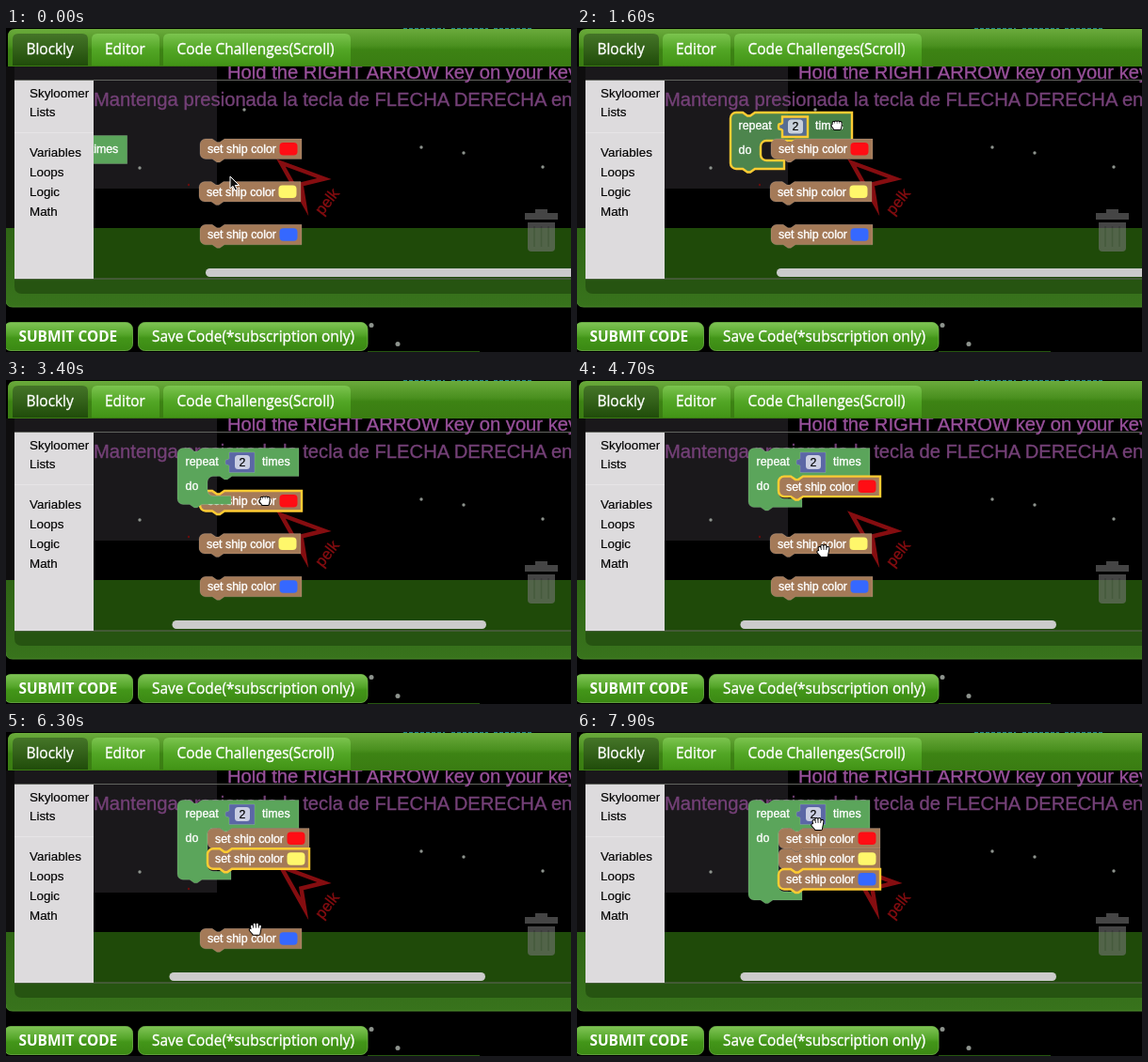
Animation of 600x345 px, one loop 8000 ms. Source, as an HTML page:

```html
<!DOCTYPE html>
<html lang="en">
<head>
<meta charset="utf-8">
<title>Block editor</title>
<style>
  html, body { margin: 0; width: 100%; height: 100%; overflow: hidden; background: #000; }
  svg { display: block; width: 100vw; height: 100vh; }
  text { white-space: pre; }
  .ui { font: 15.4px "Open Sans", "Noto Sans", sans-serif; fill: #fff; stroke: #fff; stroke-width: .35; }
  .bold { font-weight: 700; stroke: none; }
  .hint { font: 20.2px "Liberation Sans", Arial, sans-serif; stroke-width: .35; }
  .menu { font: 13.4px "Liberation Sans", Arial, sans-serif; fill: #000; stroke: #000; stroke-width: .15; }
  .block text { font: 12.4px "Liberation Sans", Arial, sans-serif; fill: #fff; stroke: #fff; stroke-width: .35; }
  .block .num { fill: #000; stroke: #000; stroke-width: .2; }
  .shape { stroke: #fff; stroke-opacity: .18; stroke-width: .8; }
  .green { fill: #5ba55b; }
  .brown { fill: #a47a58; }
  .indigo { fill: #5b67a5; }
  .selected .shape { stroke: #fc3; stroke-opacity: 1; stroke-width: 2.4; }
  .dragging .shape { fill-opacity: .78; }
</style>
</head>
<body>
<svg viewBox="0 0 600 345" preserveAspectRatio="none">
  <defs>
    <linearGradient id="bar" x2="0" y2="1">
      <stop offset="0" stop-color="#6bab3c"/>
      <stop offset=".45" stop-color="#4a901f"/>
      <stop offset=".55" stop-color="#3d8314"/>
      <stop offset="1" stop-color="#3a7c12"/>
    </linearGradient>
    <linearGradient id="tab" x2="0" y2="1">
      <stop offset="0" stop-color="#7cc44f"/>
      <stop offset=".5" stop-color="#52a625"/>
      <stop offset="1" stop-color="#429416"/>
    </linearGradient>
    <linearGradient id="active" x2="0" y2="1">
      <stop offset="0" stop-color="#457528"/>
      <stop offset="1" stop-color="#204c0a"/>
    </linearGradient>
    <linearGradient id="button" x2="0" y2="1">
      <stop offset="0" stop-color="#80c556"/>
      <stop offset=".45" stop-color="#53a428"/>
      <stop offset=".55" stop-color="#439619"/>
      <stop offset="1" stop-color="#3b8913"/>
    </linearGradient>
    <linearGradient id="frame" x2="0" y2="1">
      <stop offset="0" stop-color="#2f6515"/>
      <stop offset="1" stop-color="#38731c"/>
    </linearGradient>
    <clipPath id="work"><path d="M9 56H600V267H9z"/></clipPath>
    <path id="openHand" stroke-linecap="round" stroke-linejoin="round"
      d="M-3.6 1L-4.4-3M-1.2 0L-1.6-5M1.4 0V-5M3.8 1L4.4-3M-5.6 1L-3 4M-3.6 0H3.8L3 5H-2.4Z"/>
    <path id="closedHand" stroke-linecap="round" stroke-linejoin="round"
      d="M-3.4 0V-2M-1.1 0V-2.6M1.3 0V-2.6M3.6 0V-2M-4.6 1L-3 3M-3.4 0H3.8L3 4H-2.4Z"/>
  </defs>

  <!-- game behind the editor -->
  <rect width="600" height="345" fill="#000"/>
  <rect y="41" width="224" height="130" fill="#1a181b"/>
  <rect y="41" width="9" height="172" fill="#0e0d0e"/>
  <path d="M422 .5H466M473 .5H512M518 .5H559" stroke="#1d7f88" stroke-dasharray="4 2"/>

  <!-- panel -->
  <path d="M0 213H600V297H7Q0 297 0 290z" fill="url(#frame)"/>
  <path d="M9 213H600V283H17Q9 283 9 275z" fill="#265411"/>
  <rect x="9" y="213" width="591" height="54" fill="#1f4a09"/>
  <path d="M0 290Q0 297 7 297H600" fill="none" stroke="#4a862c"/>
  <path d="M9 55.5H600M9 267H600" stroke="#62645f"/>

  <g class="hint">
    <text x="235" y="54" fill="#98509a" stroke="#98509a">Hold the RIGHT ARROW key on your key</text>
    <text x="93" y="83" fill="#744077" stroke="#744077">Mantenga presionada la tecla de FLECHA DERECHA en</text>
  </g>
  <g id="stars" fill="#8d938d"></g>
  <circle cx="194" cy="167" r="1.2" fill="#6b0c0c"/>
  <path d="M292 143.500L338 160.500L313.500 166.500L317 188Z" fill="none" stroke="#850d10" stroke-width="4.5" stroke-miterlimit="6"/>
  <text class="hint" transform="translate(336 200) rotate(-52)" style="font-size:16.5px"
    fill="#850d10" stroke="#850d10">pelk</text>

  <!-- trash can -->
  <g fill="#777" opacity=".58">
    <path d="M551 197H562V193H575V197H586V204H551z"/>
    <path d="M554 207H583V234Q583 238 579 238H558Q554 238 554 234z"/>
    <path d="M561 211V233M568.5 211V233M576 211V233" stroke="#626762" stroke-width="1.5"/>
  </g>

  <g clip-path="url(#work)">
    <g id="blocks"></g>
    <rect id="scroll" y="256" height="9" rx="4.5" fill="#cbcbcb"/>
  </g>

  <!-- toolbox -->
  <rect x="9" y="56" width="84" height="211" fill="#dddbdd"/>
  <path d="M9 111.5H93" stroke="#e6e4e6"/>
  <g class="menu">
    <text x="25" y="73.5">Skyloomer</text>
    <text x="25" y="94">Lists</text>
    <text x="25" y="136.7">Variables</text>
    <text x="25" y="157.7">Loops</text>
    <text x="25" y="178.7">Logic</text>
    <text x="25" y="199.5">Math</text>
  </g>

  <!-- tabs -->
  <path d="M2 41V9Q2 1 10 1H600V41z" fill="url(#bar)"/>
  <path d="M7 40V12Q7 6 13 6H81Q87 6 87 12V40z" fill="url(#active)"/>
  <g fill="url(#tab)">
    <path d="M91 40V12Q91 6 97 6H157Q163 6 163 12V40z"/>
    <path d="M167 40V12Q167 6 173 6H360Q366 6 366 12V40z"/>
  </g>
  <g class="ui">
    <text x="21.5" y="28">Blockly</text>
    <text x="105" y="28">Editor</text>
    <text x="181.5" y="28">Code Challenges(Scroll)</text>
  </g>

  <!-- buttons -->
  <g fill="url(#button)" stroke="#6fb548" stroke-width=".8">
    <rect x="-2" y="313.5" width="136.5" height="30" rx="7"/>
    <rect x="140.5" y="313.5" width="243.5" height="30" rx="7"/>
  </g>
  <path d="M384 344.7H503" stroke="#2f6a14"/>
  <g class="ui">
    <text class="bold" x="13.5" y="334.4">SUBMIT CODE</text>
    <text x="155" y="334.4">Save Code(*subscription only)</text>
  </g>

  <!-- pointer -->
  <g id="cursor">
    <path id="arrow" d="M0 0V13L3 10.3L5.2 15L7.5 14L5.4 9.5H9.5Z" fill="#111" stroke="#fff"/>
    <g id="open">
      <use href="#openHand" stroke="#000" stroke-width="4"/>
      <use href="#openHand" fill="#fff" stroke="#fff" stroke-width="2"/>
    </g>
    <g id="closed">
      <use href="#closedHand" stroke="#000" stroke-width="4"/>
      <use href="#closedHand" fill="#fff" stroke="#fff" stroke-width="2"/>
    </g>
  </g>
</svg>

<script>
const LOOP = 8000, STEP = 100;
const $ = id => document.getElementById(id);

const NOTCH = 'l5 3.5h3l5 -3.5';
const BUMP = 'l-5 3.5h-3l-5 -3.5';
const CORNER = 'M0 6A6 6 0 0 1 6 0H13' + NOTCH;
const FOOT = 'H26' + BUMP + 'H6a6 6 0 0 1 -6 -6Z';

const colorPath = CORNER + 'H108V21.5' + FOOT;

// Loop block whose mouth holds the given number of statements
function loopPath(count) {
  const mouth = count ? 21.7 * count + 2.4 : 21;
  return `${CORNER}H129V30H58${BUMP}H38a6 6 0 0 0 -6 6v${mouth - 12}` +
    `a6 6 0 0 0 6 6H57v9${FOOT}`;
}

function addBlock(id, markup) {
  $('blocks').insertAdjacentHTML('beforeend', `<g id="${id}" class="block">${markup}</g>`);
}

addBlock('repeat', `
  <path id="loopShape" class="shape green"/>
  <text x="8.5" y="18">repeat</text><text x="90" y="18">times</text><text x="8.5" y="44">do</text>
  <path class="shape indigo" d="M55 4.5H82V26H55V19C53 16 51 20 51 15S53 14 55 11Z"/>
  <rect x="61" y="7.5" width="16" height="15" rx="3.5" fill="#fff" fill-opacity=".68"/>
  <text class="num" x="65.5" y="19">2</text>`);

const swatches = { red: '#ff0d14', yellow: '#fff76b', blue: '#3568ff' };
for (const [id, fill] of Object.entries(swatches)) {
  addBlock(id, `
    <path class="shape brown" d="${colorPath}"/>
    <text x="8" y="15">set ship color</text>
    <rect x="84.5" y="4" width="19" height="13.5" rx="4" fill="${fill}"/>`);
}
$('blocks').insertAdjacentHTML('beforeend',
  '<path id="marker" d="M220 124.5H227l5 3.5h3l5 -3.5H243" fill="none" stroke="#fc3" stroke-width="2.4"/>');

$('stars').innerHTML = [[253, 87], [142, 149], [441, 127], [486, 133], [570, 148], [388, 316.5], [416, 336.5]]
  .map(([x, y]) => `<circle cx="${x}" cy="${y}" r="${y > 300 ? 2.5 : 1.7}"/>`).join('');

// Paths are lists of [time, x, y]
const paths = {
  cursor: [[0, 238, 158], [600, 112, 127], [800, 112, 127], [1600, 276, 103], [2000, 295, 86],
    [2300, 295, 86], [3000, 275, 128], [3600, 275, 128], [4100, 283, 113], [4300, 283, 113],
    [4700, 262, 182], [4900, 262, 182], [5500, 265, 151], [5700, 271, 145], [5900, 271, 145],
    [6400, 264, 226], [6500, 264, 226], [7000, 272, 155], [7300, 272, 152], [7800, 256, 98]],
  repeat: [[800, -.3, 114.5], [1600, 163, 90], [2000, 182, 72.5]],
  red: [[3600, 206, 118], [4100, 214, 102.6]],
  yellow: [[4900, 205, 163.6], [5500, 207.3, 131.3], [5700, 214, 124.3]],
  blue: [[6500, 206, 209.3], [7000, 214, 163.5], [7200, 214, 146]]
};
const selected = { repeat: [700, 3000], red: [3000, 4900], yellow: [4900, 6500], blue: [6500, LOOP] };
const dragged = { repeat: [800, 2000], red: [3600, 4100], yellow: [4900, 5700], blue: [6500, 7200] };
const pointers = [[0, 'arrow'], [500, 'open'], [700, 'closed'], [2100, 'open'], [3000, 'closed'],
  [4200, 'open'], [4900, 'closed'], [5100, 'arrow'], [5700, 'open'], [6600, 'arrow'], [7300, 'open']];

const within = (t, [from, to]) => t >= from && t < to;

function place(path, t) {
  const next = path.findIndex(key => key[0] > t);
  if (next === 0) return path[0].slice(1);
  if (next < 0) return path[path.length - 1].slice(1);
  const [t0, x0, y0] = path[next - 1], [t1, x1, y1] = path[next];
  const k = (t - t0) / (t1 - t0);
  return [x0 + (x1 - x0) * k, y0 + (y1 - y0) * k];
}

function render(t) {
  for (const id in paths) {
    const [x, y] = place(paths[id], t);
    $(id).setAttribute('transform', `translate(${x} ${y})`);
  }
  for (const id in selected) {
    $(id).classList.toggle('selected', within(t, selected[id]));
    $(id).classList.toggle('dragging', within(t, dragged[id]));
  }
  const held = ['red', 'yellow', 'blue'].filter(id => t >= dragged[id][1]).length;
  $('loopShape').setAttribute('d', loopPath(held));

  // The dropped loop lies above the red block until that is picked up
  const above = within(t, [2000, 3600]) ? 'yellow' : 'red';
  if ($('repeat').nextElementSibling !== $(above)) $('blocks').insertBefore($('repeat'), $(above));

  $('marker').style.display = within(t, [5400, 5700]) ? '' : 'none';

  const [left, right] = t < 2000 ? [212, 612] : t < 4100 ? [176.5, 510] : [173.5, 509];
  $('scroll').setAttribute('x', left);
  $('scroll').setAttribute('width', right - left);

  const pointer = pointers.filter(key => key[0] <= t).pop()[1];
  for (const id of ['arrow', 'open', 'closed']) $(id).style.display = id === pointer ? '' : 'none';
}

const start = performance.now();
function tick() {
  const t = (performance.now() - start) % LOOP;
  render(Math.floor(t / STEP) * STEP);
  requestAnimationFrame(tick);
}
tick();
</script>
</body>
</html>
```
